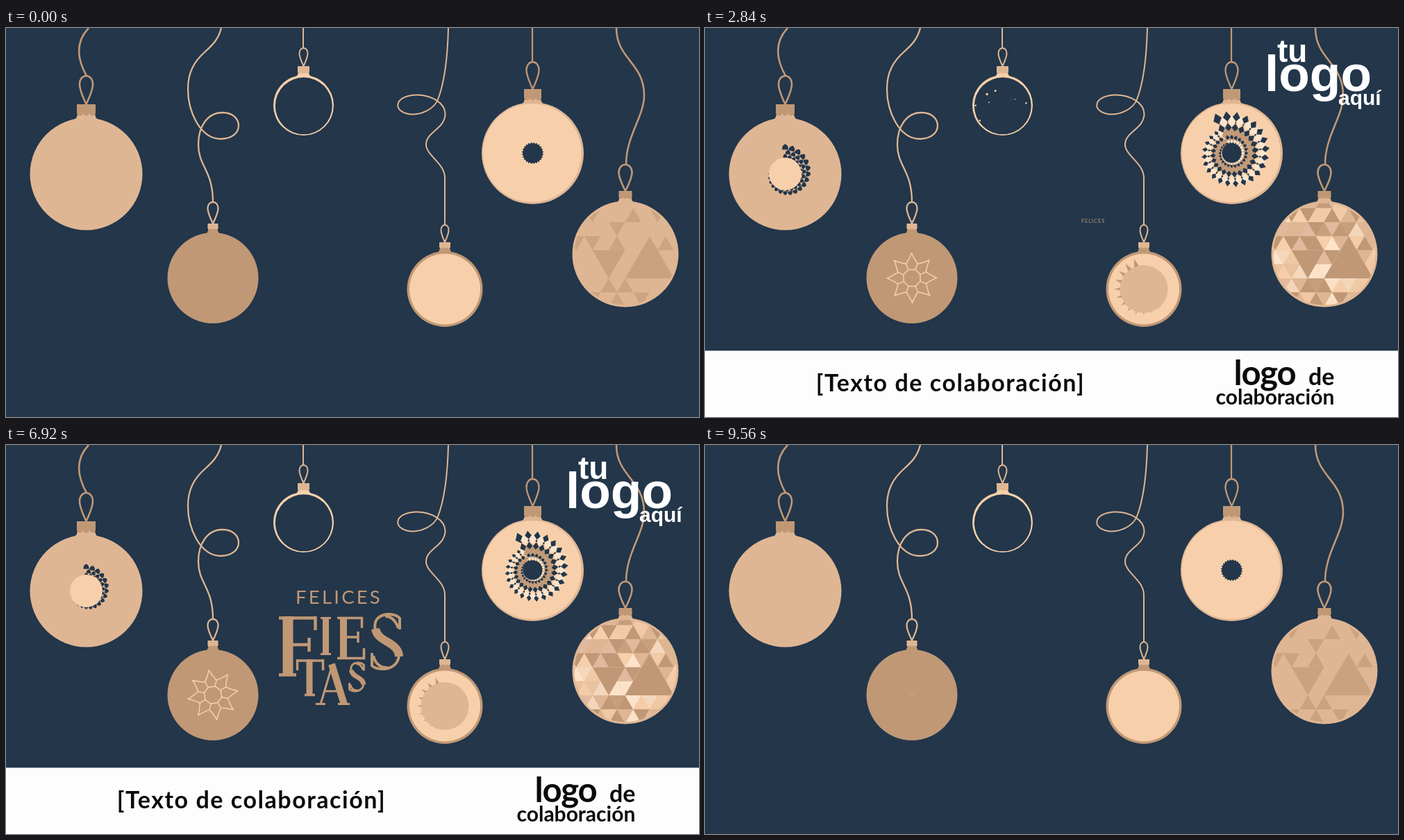
Recreate the animation shown at these times as an HTML page with a canvas. Size 998 px wide and 561 px high, loop 9.6 s.

```html
<!DOCTYPE html>
<html lang="es">
<head>
<meta charset="utf-8">
<style>
html, body { margin: 0; width: 100%; height: 100%; overflow: hidden; background: #23364a; }
canvas { display: block; }
</style>
</head>
<body>
<canvas id="stage" width="998" height="561"></canvas>
<script>
const ctx = document.getElementById('stage').getContext('2d');
const LOOP = 9600, TAU = Math.PI * 2;
const NAVY = '#23364a', BROWN = '#c09875', TAN = '#dfb693', PEACH = '#f7d0ab', CREAM = '#fde4cb';

const clamp = v => Math.max(0, Math.min(1, v));
const ramp = (t, start, length) => clamp((t - start) / length);
const easeOut = p => 1 - (1 - p) ** 3;
const rad = deg => deg * Math.PI / 180;
const polar = (r, a) => [r * Math.cos(a), r * Math.sin(a)];

function seeded(seed) {
  return () => (seed = (seed * 16807) % 2147483647) / 2147483647;
}
function disc(x, y, r, color) {
  ctx.fillStyle = color;
  ctx.beginPath();
  ctx.arc(x, y, r, 0, TAU);
  ctx.fill();
}
function poly(points, color) {
  ctx.fillStyle = color;
  ctx.beginPath();
  points.forEach(p => ctx.lineTo(...p));
  ctx.closePath();
  ctx.fill();
}
function line(d, color, width) {
  ctx.strokeStyle = color;
  ctx.lineWidth = width;
  ctx.stroke(new Path2D(d));
}
function at(x, y, scale, draw) {
  if (scale <= 0) return;
  ctx.save();
  ctx.translate(x, y);
  ctx.scale(scale, scale);
  draw();
  ctx.restore();
}
// Scales a drawing made in stage coordinates about a fixed point.
const zoom = (x, y, scale, draw) => at(x, y, scale, () => { ctx.translate(-x, -y); draw(); });

function write(text, x, y, font, color, spacing = 0, align = 'left') {
  ctx.font = font;
  ctx.fillStyle = color;
  ctx.letterSpacing = spacing + 'px';
  ctx.textAlign = align;
  ctx.fillText(text, x, y);
}

const balls = [
  { x: 115.5, y: 210.5, r: 81, fill: TAN, trim: BROWN, capW: 27, cap: 110, neck: 125, loop: 69, loopW: 9.5, lineW: 2.6,
    string: 'M119 0C100 20 102 44 116 69', art: scales },
  { x: 298, y: 360.5, r: 65.5, fill: BROWN, trim: TAN, capW: 15, cap: 282, neck: 291, loop: 251, loopW: 7.5, lineW: 2.3,
    string: 'M310 0C306 16 298 24 287 34C271 48 262 64 262 88C262 118 278 160 310 160C344 159 342 122 312 122C290 122 277 142 277 168C277 200 298 205 298 251', art: star },
  { x: 428.5, y: 111.5, r: 43.5, fill: PEACH, trim: TAN, capW: 17, cap: 55, neck: 66, loop: 29, loopW: 6, lineW: 2,
    string: 'M428 0V29', art: snow },
  { x: 632, y: 376.5, r: 54.5, fill: BROWN, trim: TAN, capW: 16, cap: 309, neck: 318, loop: 284, loopW: 5.5, lineW: 2,
    string: 'M637 0C636 40 631 80 622 103C616 118 597 125 583 124.5C557 122 557 98 590 96.5C612 96 633 108 632.5 125C631 146 605 150 605 168C605 184 632 195 632 216V284', art: sun },
  { x: 758.5, y: 180.5, r: 73.5, fill: TAN, trim: BROWN, capW: 25, cap: 88, neck: 103, loop: 49, loopW: 9, lineW: 2.3,
    string: 'M758 0V49', art: diamonds },
  { x: 892, y: 326, r: 76.5, fill: TAN, trim: BROWN, capW: 19, cap: 235, neck: 246, loop: 197, loopW: 9.5, lineW: 2.6,
    string: 'M879 0C879 45 919 50 919 97C919 128 893 155 893 197', art: mosaic }
];

function drawBall(b, u) {
  const { x, y, r, cap, neck, capW, loop, loopW: w } = b, h = cap - loop, half = capW / 2;
  line(b.string, b.trim, b.lineW);
  const wide = cap - h * .7, over = cap - h * 1.1, mid = cap - h * .5, low = cap - h * .2;
  line(`M${x} ${cap}C${x - w * .4} ${low} ${x - w} ${mid} ${x - w} ${wide}C${x - w} ${over} ${x + w} ${over} ${x + w} ${wide}C${x + w} ${mid} ${x + w * .4} ${low} ${x} ${cap}`, b.trim, b.lineW);
  disc(x, y, r, b.fill);
  const foot = y - r + 4;
  ctx.fill(new Path2D(`M${x - half + 1} ${neck - 3}H${x + half - 1}Q${x + half - 1} ${foot - 3} ${x + half + 5} ${foot}H${x - half - 5}Q${x - half + 1} ${foot - 3} ${x - half + 1} ${neck - 3}`));
  ctx.fillStyle = b.trim;
  ctx.fillRect(x - half, cap, capW, neck - cap - 2);
  for (let i = -1; i < 2; i++) disc(x + i * capW / 3, neck - 3, capW / 6, b.trim);
  at(x, y, 1, () => b.art(u));
}

function scales(u) {
  const count = 24, ratio = .82;
  for (let ring = 0; ring < 9; ring++) {
    const tip = 70 * ratio ** ring, base = tip * ratio;
    for (let i = 0; i < count; i++) {
      const part = (i + ring % 2 / 2) / count;
      const p = ramp(u, 2070 + 960 * part, 1800);
      if (!p) continue;
      const k = (23 + 47 * p) / 70, a = rad(-90) + part * TAU, d = Math.PI / count;
      ctx.fillStyle = NAVY;
      ctx.beginPath();
      ctx.moveTo(...polar(base * k, a - d * .9));
      ctx.quadraticCurveTo(...polar(tip * k * .95, a - d), ...polar(tip * k, a));
      ctx.quadraticCurveTo(...polar(tip * k * .95, a + d), ...polar(base * k, a + d * .9));
      ctx.closePath();
      ctx.fill();
    }
  }
  disc(0, 0, 23.5 * easeOut(ramp(u, 1600, 800)), PEACH);
}

function star(u) {
  const left = Math.max(0, 3800 - u) / 2560;
  const turn = rad(157.5 - 165 * left * left);
  const size = 1 - (1 - ramp(u, 0, 1150)) ** 2;
  const tip = 35 + 5 * Math.min(1, left * left), valley = 22;
  const ray = valley + (56 - valley) * easeOut(ramp(u, 3300, 1100));
  at(0, 0, size, () => {
    ctx.rotate(turn);
    ctx.strokeStyle = PEACH;
    ctx.lineWidth = 1.5;
    ctx.beginPath();
    for (let i = 0; i < 8; i++) {
      const a = i * TAU / 8 - Math.PI / 2, d = TAU / 16;
      ctx.moveTo(...polar(13, a - d));
      ctx.lineTo(...polar(13, a + d));
      ctx.lineTo(...polar(ray, a + d));
      ctx.moveTo(...polar(valley, a - d));
      ctx.quadraticCurveTo(...polar(valley + 4, a - d * .45), ...polar(tip, a));
      ctx.quadraticCurveTo(...polar(valley + 4, a + d * .45), ...polar(valley, a + d));
    }
    ctx.stroke();
  });
}

const random = seeded(4217), flakes = [];
for (let tries = 0; tries < 6000 && flakes.length < 175; tries++) {
  const [x, y] = polar(39 * Math.sqrt(random()), random() * TAU);
  const r = .8 + 1.7 * random() ** 2;
  if (flakes.every(f => Math.hypot(f.x - x, f.y - y) > f.r + r + 1.1))
    flakes.push({ x, y, r, start: 2690 + 1500 * random(), color: random() < .75 ? PEACH : TAN });
}
function snow(u) {
  disc(.3, .8, 41, NAVY);
  for (const f of flakes) disc(f.x, f.y + 1, f.r * easeOut(ramp(u, f.start, 250)), f.color);
}

function spikes(count, base, length, width, color, progress) {
  for (let i = 0; i < count; i++) {
    const p = progress(i / count), a = rad(-108) - i / count * TAU;
    if (p) poly([polar(base - 2, a - width * p / base), polar(base + length * p, a), polar(base - 2, a + width * p / base)], color);
  }
}
function sun(u) {
  disc(0, 0, 51, PEACH);
  spikes(20, 34, 15, 5.4, BROWN, part => ramp(u, 2120 + 1090 * part, 900));
  disc(0, 0, 34.5 * easeOut(ramp(u, 1600, 800)), TAN);
  spikes(14, 18, 12.5, 4.2, NAVY, part => ramp(u, 3300 + 500 * part, 700));
  disc(0, 0, 18.5 * easeOut(ramp(u, 2900, 700)), BROWN);
}

function diamonds(u) {
  disc(-.8, -.3, 71, PEACH);
  const count = 24, ratio = .85;
  [NAVY, CREAM, NAVY, BROWN, BROWN, NAVY, BROWN, CREAM, NAVY].forEach((color, ring) => {
    const tip = 64 * ratio ** ring, lead = color === CREAM ? 250 : 0;
    for (let i = 0; i < count; i++) {
      const part = (i + ring % 2 / 2) / count;
      const k = (16 + 48 * ramp(u, 700 + 1060 * part - lead, 2250)) / 64 * tip;
      const a = rad(-112.5) + part * TAU, d = Math.PI / count;
      poly([polar(k, a), polar(k * ratio, a + d), polar(k * ratio * ratio, a), polar(k * ratio, a - d)], color);
    }
  });
  disc(0, 0, 14, NAVY);
}

// Dark cells of the mosaic as "row,column".
const dark = new Set(['-3,1', '-3,-4', '-3,4', '-2,-1', '-1,-4', '-1,-6', '-1,-1', '-1,5', '2,-2', '2,0', '3,-1', '3,-4', '3,2']);
const tints = [PEACH, PEACH, CREAM, '#e2bba0', '#edc6a2', TAN, BROWN];
function mosaic(u) {
  const w = 11.7, h = 20.25, pick = seeded(907);
  ctx.save();
  ctx.beginPath();
  ctx.arc(0, 0, 73.5, 0, TAU);
  ctx.clip();
  for (let row = -4; row < 4; row++) {
    for (let col = -7; col < 8; col++) {
      const top = -5.5 + row * h, x = col * w - .5, up = (row + col) % 2 === 0;
      const isDark = dark.has(row + ',' + col);
      const color = isDark ? BROWN : tints[Math.floor(pick() * tints.length)];
      const delay = 60 + pick() * 500, phase = pick() * TAU;
      const shown = ramp(u, delay, 600) * (.85 + .15 * Math.sin(u / 700 + phase));
      ctx.globalAlpha = isDark ? .6 + .4 * ramp(u, 0, 900) : shown;
      const tipY = up ? top : top + h, baseY = up ? top + h : top;
      poly([[x, tipY], [x + w, baseY], [x - w, baseY]], color);
    }
  }
  ctx.globalAlpha = 1;
  const fade = 1 - ramp(u, 0, 900);
  const big = `rgb(${192 + 11 * fade},${152 + 10 * fade},${117 + 11 * fade})`;
  poly([[35, -25.7], [70, 35], [-.5, 35]], big);
  poly([[-47.3, -5.5], [-.5, -5.5], [-24, 35]], big);
  ctx.restore();
}

const sSpine = 'M532 265C535 285 565 283 566 305';
const sHooks = 'M532 267C526 241 559 240 567 250V266M565 264C560 250 552 247 546 247M566 303C564 327 534 326 527 318V300M529 304C532 316 540 322 550 321';
// Lettering: start time, [path, stroke width] pairs, optional placement.
const letters = [
  { start: 4000, strokes: [['M406 247V333', 15], ['M393 249.5H447M405 288H438M393 331.5H418', 4.5], ['M445.5 247V267M436.5 278V298', 4.5]] },
  { start: 4950, strokes: [['M460.5 248V303', 9], ['M453 249.5H468M453 301.5H468', 3]] },
  { start: 5000, strokes: [['M486 248V309', 10], ['M477 249.5H514M486 277H508M477 307.5H517', 3.5], ['M512.5 248V264M507 269V285M515.5 293V309', 3.5]] },
  { start: 4600, strokes: [[sSpine, 12], [sHooks, 4]] },
  { start: 5050, strokes: [['M437 309V362', 9], ['M418 311H458M430 360.5H445', 3.5], ['M419.5 309V325M456.5 309V325', 3.5]] },
  { start: 4680, strokes: [['M469 316L487 374', 10], ['M469 320L453 374M458 355H481M446 373.5H460M478 373.5H495', 3]] },
  { start: 5100, place: [505.5, 335, .52], strokes: [[sSpine, 13], [sHooks, 5.5]] }
];
function drawLetters(t) {
  for (const { start, strokes, place } of letters) {
    const p = ramp(t, start, 700);
    if (!p) continue;
    const [x, y, k] = place || [548, 284.5, 1];
    at(x, y, k, () => {
      ctx.translate(-548, -284.5);
      strokes.forEach(([d, width], i) => {
        const q = i ? clamp(p * 2 - 1) : p;
        if (!q) return;
        ctx.setLineDash([q * 120, 300]);
        line(d, BROWN, width * q * q);
      });
    });
  }
  ctx.setLineDash([]);
}

function drawGreeting(t) {
  ctx.globalAlpha = 1 - ramp(t, 7800, 470);
  if (ctx.globalAlpha > 0) {
    zoom(589, 301, easeOut(ramp(t, 2760, 800)), () =>
      write('FELICES', 479.5, 229, '27.5px Lato, sans-serif', BROWN, 3.2, 'center'));
    drawLetters(t);
  }
  ctx.globalAlpha = 1;
}

function drawLogo(t) {
  const scale = easeOut(ramp(t, 1100, 980)) * (1 - ramp(t, 9020, 380) ** 2);
  const font = size => `700 ${size}px "Liberation Sans", Arial, sans-serif`;
  zoom(920, 95, scale, () => {
    write('tu', 824, 48.5, font(46), '#fff');
    write('logo', 806, 91, font(73), '#fff');
    write('aquí', 912, 111, font(30), '#fff');
  });
}

function drawFooter(t) {
  const drop = 96 * ((1 - ramp(t, 500, 1230)) ** 3 + ramp(t, 7900, 860) ** 3);
  if (drop >= 96) return;
  const font = size => `700 ${size}px Lato, sans-serif`, ink = '#0b0b0b';
  ctx.save();
  ctx.translate(0, drop);
  ctx.fillStyle = '#fdfdfd';
  ctx.fillRect(0, 465.4, 998, 96);
  zoom(352, 512, easeOut(ramp(t, 1350, 850)), () =>
    write('[Texto de colaboración]', 353.5, 524, font(34), ink, 1.55, 'center'));
  zoom(821, 512, easeOut(ramp(t, 1190, 950)), () => {
    write('logo', 761.5, 515, font(49), ink, -1.2);
    write('de', 869, 515, font(34), ink);
    write('colaboración', 735.5, 543, font(30), ink);
  });
  ctx.restore();
}

function frame(now) {
  const t = now % LOOP, u = Math.min(t, LOOP - t);
  ctx.fillStyle = NAVY;
  ctx.fillRect(0, 0, 998, 561);
  balls.forEach(b => drawBall(b, u));
  drawGreeting(t);
  drawLogo(t);
  drawFooter(t);
  requestAnimationFrame(frame);
}
requestAnimationFrame(frame);
</script>
</body>
</html>
```
